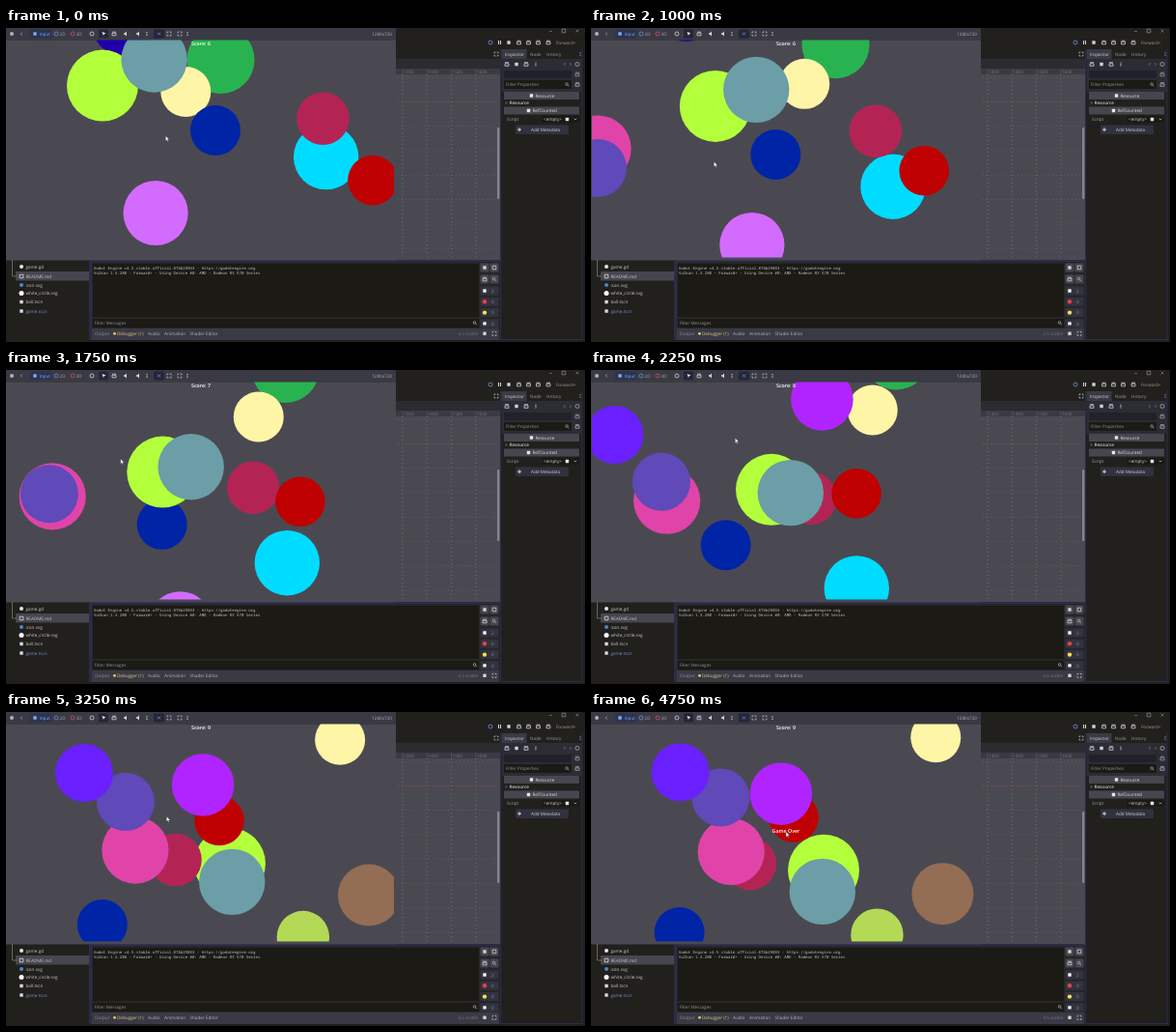
An HTML page for the animation above (5 s loop, 600 by 325 pixels).

```html
<!DOCTYPE html>
<html lang="en">
<head>
<meta charset="utf-8">
<title>Bouncing circles in the editor</title>
<style>
  html, body { margin: 0; width: 100%; height: 100%; overflow: hidden; background: #21201c; }
  svg { display: block; width: 100vw; height: 100vh; }
  text { font-family: "Open Sans", "Noto Sans", sans-serif; font-size: 4.6px; text-rendering: geometricPrecision; white-space: pre; }
  .mono { font-family: "Noto Sans Mono", "DejaVu Sans Mono", monospace; font-size: 4.06px; }
  .game { font-size: 5.3px; font-weight: 600; fill: #fff; text-anchor: middle; }
</style>
</head>
<body>
<svg id="stage" viewBox="0 0 600 325">
  <defs><clipPath id="view"><rect x="1" y="12.5" width="401" height="225"/></clipPath></defs>
  <g id="ui"></g>
  <g id="balls" clip-path="url(#view)"></g>
  <text id="score" class="game" x="202" y="18.2"></text>
  <text id="over" class="game" x="202" y="125.2">Game Over</text>
  <path id="cursor" d="M0 0V5.6L1.3 4.4L2.2 6.3L3.1 5.9L2.2 4L4 3.9Z" fill="#fff" stroke="#222" stroke-width=".4"/>
</svg>
<script>
const NS = 'http://www.w3.org/2000/svg';
const $ = id => document.getElementById(id);
const ui = $('ui');

const DARK = '#21201c', DEEP = '#1b1a14', BAR = '#3a3a44', RAISED = '#47464f', EDGE = '#34346c';

function add(parent, tag, attrs, label) {
  const el = document.createElementNS(NS, tag);
  for (const k in attrs) el.setAttribute(k, attrs[k]);
  if (label) el.textContent = label;
  parent.appendChild(el);
  return el;
}
const box = (x, y, width, height, fill, rx = 0) => add(ui, 'rect', { x, y, width, height, fill, rx });
const label = (x, y, str, fill = '#c4c4cc', more = {}) => add(ui, 'text', { x, y: y + 1.7, fill, ...more }, str);
const dot = (cx, cy, r, fill) => add(ui, 'circle', { cx, cy, r, fill });
const line = (d, stroke = '#d0d0d8', width = .8, more = {}) =>
  add(ui, 'path', { d, stroke, 'stroke-width': width, fill: 'none', ...more });

// Small icons centred on x, y
const icon = {
  ring: (x, y, c) => line(`M${x - 2} ${y}a2 2 0 1 0 4 0a2 2 0 1 0 -4 0`, c),
  square: (x, y, c) => line(`M${x - 1.8} ${y - 1.8}h3.6v3.6h-3.6z`, c),
  fill: (x, y, c = '#d0d0d8') => box(x - 1.7, y - 1.7, 3.4, 3.4, c, .5),
  pause: (x, y, c) => line(`M${x - 1} ${y - 2}v4M${x + 1} ${y - 2}v4`, c, 1.1),
  dots: (x, y, c) => line(`M${x} ${y - 2}v1M${x} ${y - .5}v1M${x} ${y + 1}v1`, c, 1),
  plus: (x, y, c) => line(`M${x - 2} ${y}h4M${x} ${y - 2}v4`, c, .9),
  cross: (x, y, c) => line(`M${x - 1.5} ${y - 1.5}l3 3m0 -3l-3 3`, c, .6),
  down: (x, y, c) => line(`M${x - 1.3} ${y - .7}l1.3 1.3l1.3 -1.3`, c, .7),
  left: (x, y, c) => line(`M${x + .7} ${y - 1.5}l-1.5 1.5l1.5 1.5`, c, .7),
  right: (x, y, c) => line(`M${x - .7} ${y - 1.3}l1.3 1.3l-1.3 1.3`, c, .7),
  search: (x, y, c) => line(`M${x - 1.7} ${y - .4}a1.3 1.3 0 1 0 2.6 0a1.3 1.3 0 1 0 -2.6 0M${x + .6} ${y + .6}l1.4 1.4`, c, .6),
  arrow: (x, y, c = '#f0f0f4') => add(ui, 'path', { d: `M${x - 1.5} ${y - 2}l4 1.6l-1.8 .6l-.7 1.8z`, fill: c }),
  speaker: (x, y, c = '#d8d8de') => add(ui, 'path', { d: `M${x - 2} ${y - .8}h1.2l1.8 -1.6v4.8l-1.8 -1.6h-1.2z`, fill: c }),
  film: (x, y, c) => line(`M${x - 2} ${y - .7}h4v2.5h-4zM${x - 2} ${y - 1.8}h4`, c),
  expand: (x, y, c) => line(`M${x - 2} ${y - .7}v-1.3h1.3M${x + .7} ${y - 2}h1.3v1.3M${x + 2} ${y + .7}v1.3h-1.3M${x - .7} ${y + 2}h-1.3v-1.3`, c, .7),
};
const icons = (y, list, color) => list.forEach(([x, kind]) => icon[kind](x, y, color));

function drawGamePanel() {
  box(0, 0, 600, 325, DARK);
  box(0, 0, 404, 12.5, BAR);
  box(0, 12.5, 404, 228, '#4a4952');
  box(404, 48, 108, 192, '#4a4952');
  box(404, 32, 108, 10, '#2b2b30');
  box(404, 42, 108, 6, BAR);
  for (let x = 411; x < 512; x += 25.3) {
    line(`M${x} 48V240`, '#8c8a68', .6, { 'stroke-dasharray': '1 3' });
    line(`M${x} 42V48`, '#6a6a74', .4);
    label(x + 1, 45, String(Math.round((x - 411) / 25.3) * 100 + 1300), '#77767f', { 'font-size': 3 });
  }
  for (let y = 51; y < 240; y += 25.3) line(`M406 ${y}H510`, '#77755f', .5, { 'stroke-dasharray': '1 3' });
  line('M406 76.7H510', '#8a4450', .7, { 'stroke-dasharray': '2 2' });
  box(509, 103, 2.4, 74, '#85848a', 1);

  dot(6, 6, 2, '#b0b0b8');
  icon.left(16, 6, '#b0b0b8');
  box(25, 1.5, 22, 9, '#2c3350', 1);
  icon.fill(30, 6, '#79aef0');
  label(34.5, 6, 'Input', '#79aef0');
  icon.ring(52, 6, '#6f93c8');
  label(55.5, 6, '2D', '#a9a9b1');
  icon.ring(69, 6, '#c05863');
  label(72.5, 6, '3D', '#a9a9b1');
  icon.ring(89, 6);
  box(96, 1.5, 10, 9, '#25253a', 1);
  icon.arrow(101, 6);
  icon.film(112, 6);
  icon.speaker(124, 6);
  icon.speaker(137, 6);
  icon.dots(146, 6);
  box(153, 1.5, 11, 9, '#25253a', 1);
  icon.cross(158.5, 6, '#79aef0');
  icon.expand(169, 6);
  icon.expand(180, 6);
  icon.dots(188, 6);
  label(400, 6, '1280x720', '#b0b0b8', { 'text-anchor': 'end' });
}

function drawInspector() {
  line('M563 3.5h3', '#88888f', .6);
  icon.square(578, 3, '#88888f');
  icon.cross(592, 3, '#88888f');
  icon.ring(502, 15, '#6f93e0');
  icons(15, [[511.5, 'pause'], [521, 'fill'], [531.5, 'film'], [541.5, 'film'], [551.5, 'film'], [562, 'film']]);
  label(570, 15, 'Forward+', '#9aa08a');
  icon.expand(508, 27);

  box(513.5, 32, 83, 34, '#2c2c34');
  box(513.5, 22, 26, 10, BAR);
  label(517, 27, 'Inspector', '#d0d0d8');
  label(543, 27, 'Node', '#9a9aa2');
  label(560, 27, 'History', '#9a9aa2');
  icon.dots(595, 27, '#8b8b94');
  icons(37.5, [[519, 'film'], [529, 'fill'], [539, 'film'], [549, 'dots']]);
  icon.left(579, 37.5, '#888');
  icon.right(585, 37.5, '#888');
  icon.ring(592, 37.5, '#aaa');
  box(516, 44, 70, 8, '#21212a', 1);
  icon.film(592, 48, '#999');
  box(516, 54, 70, 9, DEEP, 1);
  label(518, 58.5, 'Filter Properties', '#92929a');
  icon.search(581.5, 58.5, '#bbb');
  icon.film(592, 58.5, '#aaa');

  box(516, 66, 78, 8, RAISED);
  icon.fill(544.5, 70, '#e4e4ea');
  label(548.5, 70, 'Resource', '#dedee4');
  icon.right(518.5, 77.5, '#aaa');
  label(521.5, 77.5, 'Resource', '#c8c8d4', { 'font-weight': 600, 'font-size': 4.3 });
  box(516, 81.5, 78, 8, RAISED);
  icon.fill(541.5, 85.5, '#e4e4ea');
  label(545.5, 85.5, 'RefCounted', '#dedee4');
  label(519, 94.5, 'Script', '#a4a4ac');
  box(555, 91, 39, 7, DEEP);
  label(557, 94.5, '<empty>', '#d0d0d8');
  icon.fill(581.5, 94.5, '#e4e4ea');
  icon.down(590, 94.5);
  box(528, 100.5, 55, 9.5, '#31313f', 1);
  icon.plus(532, 105.2, '#e4e4ea');
  label(544, 105.2, 'Add Metadata', '#d0d0d8');
  line('M512.7 22V323M597 22V323M513 322.6H597', EDGE, .7);
}

function drawFiles() {
  box(10, 252, 76, 9.5, RAISED);
  line('M6.5 240V257H11', '#95958c', .6);
  const files = [
    [247, 'game.gd', '#e4e4ea'], [257, 'README.md', '#e4e4ea'], [266, 'icon.svg', '#4b86c8'],
    [274.5, 'white_circle.svg', '#fff'], [283.5, 'ball.tscn', '#d8d8de'], [293, 'game.tscn', '#d8d8de'],
  ];
  files.forEach(([y, name, c], i) => {
    if (i === 1) icon.square(16, y, c);
    else if (i > 3) icon.fill(16, y, c);
    else dot(16, y, i === 3 ? 2.5 : 2, c);
    label(20.5, y, name, i === 5 ? '#7d8fd0' : '#c8c8d0');
  });
  line('M86.5 241V323', EDGE, .6);
}

function drawOutput() {
  box(88, 241, 424, 82, '#26262a');
  box(90, 244, 400, 55, DEEP);
  box(89, 311, 422, 12, BAR);
  line('M88 323V241H512', EDGE, 1);
  label(91, 247.8, 'Godot Engine v4.5.stable.official.876b29033 - https://godotengine.org', '#c0c0c8', { class: 'mono' });
  label(91, 253, 'Vulkan 1.3.280 - Forward+ - Using Device #0: AMD - Radeon RX 570 Series', '#c0c0c8', { class: 'mono' });
  box(90, 301, 400, 9, DEEP, 1);
  label(91.5, 305.3, 'Filter Messages', '#92929a');
  icon.search(486, 305.3, '#ccc');

  for (const y of [248, 260]) for (const x of [496, 506]) box(x - 4.5, y - 4.5, 9, 9, RAISED, 1);
  icons(248, [[496, 'fill'], [506, 'square']]);
  icons(260, [[496, 'film'], [506, 'search']]);
  ['#f4f4f8', '#e8404a', '#f4e050', '#f4f4f8'].forEach((c, i) => {
    const y = 272 + i * 11.3;
    box(491.5, y - 4.5, 19, 9, '#33333e', 1);
    if (i % 3) dot(496, y, 2.2, c); else icon.fill(496, y, c);
    label(503, y, i === 0 ? '2' : '0', '#7d8fd0');
  });

  label(92, 316.3, 'Output', '#8f8f98');
  dot(112.5, 316.3, 1.4, '#f0d060');
  label(115, 316.3, 'Debugger (1)', '#dcc878');
  label(147, 316.3, 'Audio', '#b4b4bc');
  label(164, 316.3, 'Animation', '#b4b4bc');
  label(190.5, 316.3, 'Shader Editor', '#b4b4bc');
  label(489, 316.3, '4.5.stable', '#74747c', { 'text-anchor': 'end' });
  icons(316.3, [[496, 'fill'], [506, 'expand']]);
}

drawGamePanel();
drawInspector();
drawFiles();
drawOutput();

// color, radius, start x, y, velocity x, y (px per second of play), spawn time in ms
const balls = [
  ['#1f00a8', 30, 120, -1.5, -34, -23, 0],
  ['#28b350', 35, 222.5, 33, 49.3, -25, 0],
  ['#fff5a6', 26, 186.3, 66, 55.5, -12.9, 0],
  ['#0024a6', 26, 217, 106, -40.7, 39.6, 0],
  ['#b4ff3c', 37, 100, 59.6, 45.8, 33.8, 0],
  ['#00dcff', 33.7, 331.7, 133.6, -29.7, 48.6, 0],
  ['#b32455', 27.3, 328.4, 93.7, -53.1, 20.6, 0],
  ['#6b9ea6', 34.2, 153.6, 32.5, 28, 49.8, 0],
  ['#bf0000', 25.8, 380, 157.6, -55.2, -15.7, 0],
  ['#d46bff', 33.6, 155.1, 191.5, 18.7, 52.5, 0],
  ['#e044a8', 34.6, -28.5, 120, 56.4, 8, 1000],
  ['#6049b8', 30, -25.8, 159.6, 52, -23.1, 1000],
  ['#6a20ff', 30, -85.2, 74.8, 57.7, -4.1, 2000],
  ['#b024ff', 32.3, 307.8, -57, -36, 46, 2000],
  ['#b4d957', 27.2, 472, 267.6, -57, -12, 3000],
  ['#936d54', 32, 543, 209.7, -58, -7, 3000],
].map(([fill, r, x, y, vx, vy, born]) => ({ el: add($('balls'), 'circle', { r, fill }), x, y, vx, vy, born }));

// Play clock: slow start, steady run, stop at game over
const clock = [[0, 0], [250, .04], [500, .13], [750, .38], [1000, .63], [1750, 1.36], [2250, 1.9], [2750, 2.38], [3250, 2.88], [3450, 3.08]];
const path = [[0, 165.3, 111.5], [1000, 127.3, 138.3], [1750, 118.6, 91.8], [2250, 149.3, 70.3], [2750, 161, 86.5], [3250, 166.3, 108], [3500, 202, 123.8]];

function sample(keys, t) {
  const i = keys.findIndex(k => k[0] > t);
  if (i < 0) return keys[keys.length - 1].slice(1);
  const a = keys[i - 1], b = keys[i], f = (t - a[0]) / (b[0] - a[0]);
  return a.slice(1).map((v, j) => v + (b[j + 1] - v) * f);
}

function draw(t) {
  const [play] = sample(clock, t);
  for (const b of balls) {
    b.el.setAttribute('cx', b.x + b.vx * play);
    b.el.setAttribute('cy', b.y + b.vy * play);
    b.el.style.display = t >= b.born ? '' : 'none';
  }
  $('score').textContent = 'Score: ' + (6 + [1250, 2250, 3250].filter(s => t >= s).length);
  $('over').style.display = t >= 3500 ? '' : 'none';
  $('cursor').setAttribute('transform', `translate(${sample(path, t)})`);
}

const LOOP = 5000, STEP = 250;
const start = performance.now();
function tick() {
  const t = (performance.now() - start) % LOOP;
  draw(Math.floor(t / STEP) * STEP);
  requestAnimationFrame(tick);
}
tick();
</script>
</body>
</html>
```
